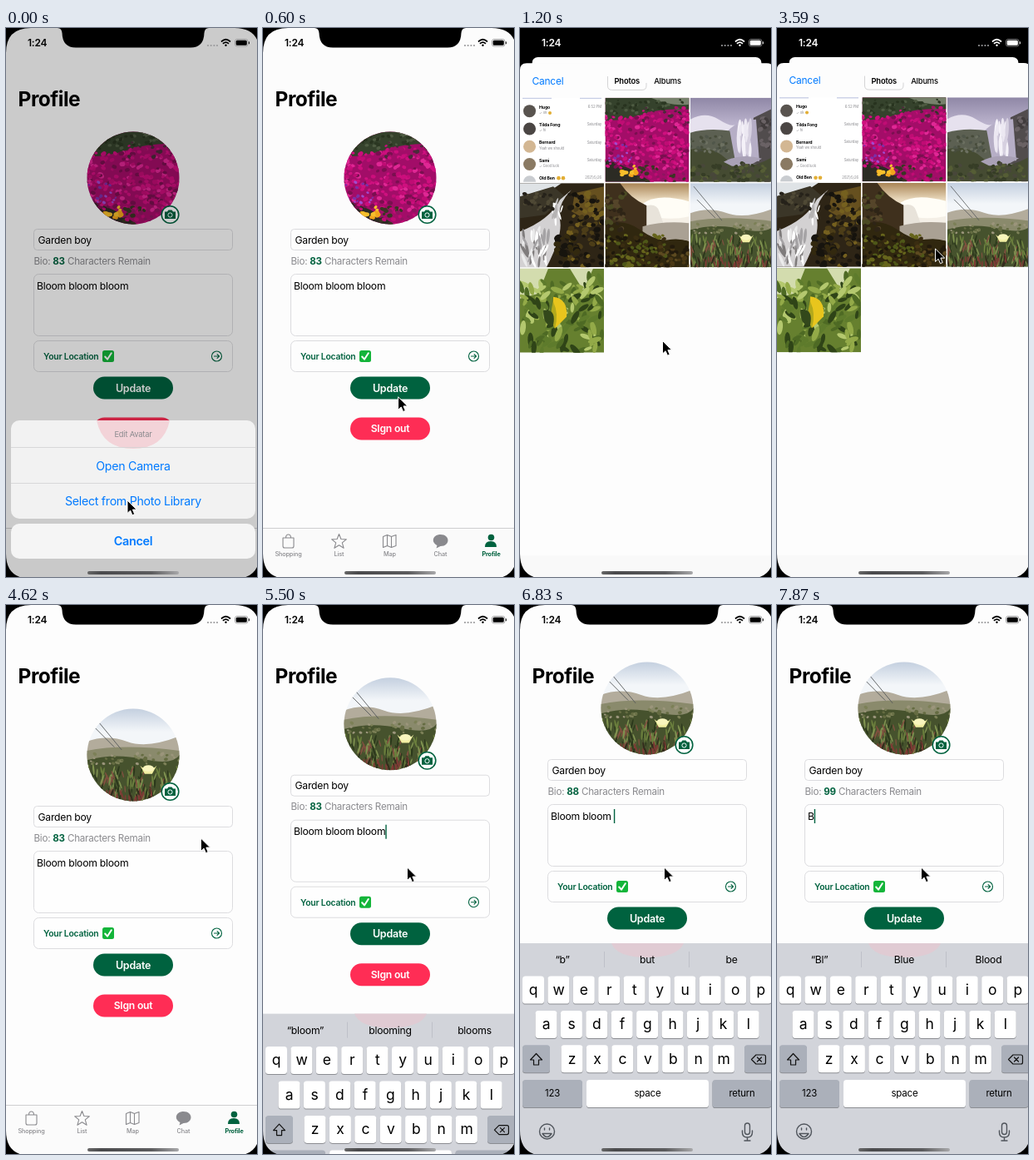
These frames come from a looping animation (302x659 px, 8 s). An HTML page:

```html
<!DOCTYPE html>
<html lang="en">
<head>
<meta charset="utf-8">
<title>Profile editor</title>
<style>
html, body { margin: 0; width: 100%; height: 100%; overflow: hidden; background: #000; }
svg { display: block; width: 100%; height: 100%; font-family: Inter, Roboto, sans-serif; }
text { letter-spacing: -.02em; white-space: pre; }
.mid { text-anchor: middle; }
.end { text-anchor: end; }
.semi { font-weight: 600; }
.bold { font-weight: 700; }
.blue { fill: #007aff; }
.green { fill: #00623f; }
.white { fill: #fff; }
.grey { fill: #8a8a8e; }
.field { fill: #fefefe; stroke: #d9d9dc; stroke-width: .9; }
.line { fill: none; stroke-linecap: round; stroke-linejoin: round; }
</style>
</head>
<body>
<svg viewBox="0 0 302 659" preserveAspectRatio="none">
<defs>
  <clipPath id="cardClip"><rect width="305" height="659" rx="8"/></clipPath>
  <clipPath id="avatarClip"><circle cx="153" cy="180" r="55.5"/></clipPath>
  <clipPath id="cellClip"><rect width="101" height="101"/></clipPath>
  <linearGradient id="dusk" x2="0" y2="1"><stop stop-color="#8f87a6"/><stop offset=".3" stop-color="#b9b1cb"/></linearGradient>
  <linearGradient id="glow" x2="0" y2="1"><stop stop-color="#a98455"/><stop offset=".2" stop-color="#e9d9bd"/><stop offset=".4" stop-color="#f4efe6"/></linearGradient>
  <linearGradient id="sky" x2="0" y2="1"><stop stop-color="#c3cfdf"/><stop offset=".25" stop-color="#f3f6f9"/></linearGradient>
  <linearGradient id="bar"><stop stop-color="#666"/><stop offset=".15" stop-color="#4a4a4c"/><stop offset=".7" stop-color="#5c5c5e"/><stop offset="1" stop-color="#a8a8aa"/></linearGradient>

  <g id="chats" clip-path="url(#cellClip)">
    <rect width="101" height="101" fill="#fff"/>
    <path d="M3 .5H38M72 .5H98" stroke="#8f9bc9" stroke-width=".8"/>
    <g id="chatRows"></g>
  </g>

  <g id="flowers" clip-path="url(#cellClip)">
    <rect width="101" height="101" fill="#a30d68"/>
    <path d="M0 0H101V14Q70 12 45 20T0 27Z" fill="#35422c"/>
    <path d="M55 0H101V8Q80 11 55 0" fill="#77816c"/>
    <path d="M0 74Q30 82 55 101H0Z" fill="#2c2b24"/>
    <g id="flowerDots"></g>
  </g>

  <g id="gorge" clip-path="url(#cellClip)">
    <rect width="101" height="101" fill="url(#dusk)"/>
    <path d="M0 26Q18 16 34 26T54 32L40 44H0Z" fill="#e6e1ee"/>
    <path d="M0 42Q20 36 50 40L60 80 0 92Z" fill="#5c6052"/>
    <path d="M76 24L101 12V80H70Z" fill="#514c4d"/>
    <path d="M47 38Q64 26 79 26L83 76H54Z" fill="#b6aec6"/>
    <g id="gorgeFall"></g>
    <path d="M0 62Q25 56 44 74T101 70V101H0Z" fill="#454b32"/>
    <path d="M40 77Q60 66 86 73L70 82H50Z" fill="#a9a1b6"/>
    <g id="gorgeDots"></g>
  </g>

  <g id="cascade" clip-path="url(#cellClip)">
    <rect width="101" height="101" fill="#2e2516"/>
    <path d="M0 0H50L38 8 0 22Z" fill="#dfe3e6"/>
    <path d="M0 16L40 4 54 16 30 38 0 42Z" fill="#3b3628"/>
    <path d="M62 8Q44 26 48 44T32 101H0V58Q36 44 48 20Z" fill="#d3d1d2"/>
    <g id="cascadeFall"></g>
    <path d="M66 12L101 4V30L80 44 62 34Z" fill="#66501f"/>
    <g id="cascadeDots"></g>
  </g>

  <g id="valley" clip-path="url(#cellClip)">
    <rect width="101" height="101" fill="url(#glow)"/>
    <path d="M46 24Q64 12 101 22V40Q74 46 52 38Z" fill="#fffdf6"/>
    <path d="M0 0H18Q30 18 50 27V62H0Z" fill="#3f301d"/>
    <path d="M50 27Q62 24 65 34L72 54H50Z" fill="#e8e3da"/>
    <path d="M45 52Q70 45 101 48V76H45Z" fill="#aaa194"/>
    <path d="M0 50Q22 42 42 56T76 68 101 70V101H0Z" fill="#30270f"/>
    <g id="valleyDots"></g>
  </g>

  <g id="meadow" clip-path="url(#cellClip)">
    <rect width="101" height="101" fill="url(#sky)"/>
    <path d="M0 36Q22 28 44 36T101 30V66H0Z" fill="#b3ac9c"/>
    <path d="M0 46Q40 38 101 46V70H0Z" fill="#8a8a6c"/>
    <path d="M0 56Q30 48 62 55T101 50V101H0Z" fill="#46522d"/>
    <path d="M4 4L38 45M8 20L30 42" stroke="#55585a" stroke-width=".8"/>
    <g id="meadowBlades"></g>
    <path d="M58 62Q62 67 67 62 72 67 76 62L71 71H63Z" fill="#f2efa2"/>
    <ellipse cx="67" cy="65" rx="6" ry="3.5" fill="#f8f5bd"/>
  </g>

  <g id="leaves" clip-path="url(#cellClip)">
    <rect width="101" height="101" fill="#66802f"/>
    <path d="M0 0H34L22 30 0 36ZM60 0H88L76 26Z" fill="#d3dcae"/>
    <g id="leafBlades"></g>
    <path d="M40 34Q58 36 56 58L42 72Q38 54 40 34" fill="#e8c51d"/>
    <path d="M40 40Q47 54 42 72 34 60 40 40" fill="#b3a91c"/>
    <path d="M28 50Q44 48 40 68 28 70 28 50" fill="#33481b"/>
  </g>
</defs>

<rect width="302" height="659"/>

<g id="screen" clip-path="url(#cardClip)">
  <rect width="305" height="659" fill="#fdfdfd"/>
  <text x="14.5" y="94" class="bold" font-size="24.5">Profile</text>
  <g id="form">
    <g clip-path="url(#avatarClip)">
      <use id="oldAvatar" href="#flowers" transform="translate(97 124) scale(1.11)"/>
      <use id="newAvatar" href="#meadow" transform="translate(97 124) scale(1.11)"/>
    </g>
    <circle cx="197.5" cy="224" r="10.3" fill="#fff" stroke="#00623f" stroke-width="1.6"/>
    <path class="green" d="M191 220.5h3l1.5-2h4l1.5 2h3v8.5h-13z"/>
    <circle cx="197.5" cy="224.5" r="2.6" fill="#00623f" stroke="#fff"/>
    <rect class="field" x="33.5" y="241.5" width="239" height="25" rx="4"/>
    <text x="38.5" y="258.5" font-size="12.2">Garden boy</text>
    <text x="33.5" y="283.7" font-size="11.6" class="grey">Bio: <tspan id="left" class="green bold">83</tspan> Characters Remain</text>
    <rect class="field" x="33.5" y="295.5" width="239" height="74" rx="6"/>
    <text id="bio" x="37" y="313.5" font-size="12.2">Bloom bloom bloom</text>
    <rect id="caret" y="301" width="1.4" height="17" class="green"/>
    <rect class="field" x="33.5" y="375.5" width="239" height="37" rx="6"/>
    <text x="45" y="398" class="semi green" font-size="10.4">Your Location</text>
    <rect x="116" y="387" width="14" height="14" rx="2.5" fill="#14b53a"/>
    <path class="line" d="M119.2 394.5l2.8 3.2 4.8-7.4" stroke="#fff" stroke-width="2"/>
    <g class="line" stroke="#00623f" stroke-width="1.1"><circle cx="253.5" cy="394" r="6"/><path d="M250.5 394h6m-2.4-2.4l2.4 2.4-2.4 2.4"/></g>
    <rect x="105" y="418.5" width="96" height="27" rx="13.5" class="green"/>
    <text x="153" y="436.6" class="mid semi white" font-size="12.5">Update</text>
    <rect x="105" y="467.5" width="96" height="27" rx="13.5" fill="#ff2d55"/>
    <text x="153" y="485.3" class="mid semi white" font-size="12.2">SIgn out</text>
  </g>
  <path d="M0 600.5H305V659H0Z" fill="#fbfbfb"/>
  <path d="M0 600.5H305" stroke="#cfcfd1"/>
  <g class="line" stroke="#8a8a8e" stroke-width="1.1">
    <path d="M24 612h13v10q0 2-2 2H26q-2 0-2-2zM27.5 612q0-4 3-4t3 4"/>
    <path d="M91.5 607.5l2.4 6 6.4.4-5 4 1.8 6.4-5.6-3.6-5.6 3.6 1.8-6.4-5-4 6.4-.4z"/>
    <path d="M144.5 610.5l5-2 5 2 5.5-2v13l-5.5 2-5-2-5 2zM149.5 608.5v13M154.5 610.5v13"/>
  </g>
  <path class="grey" d="M213.5 608c12 0 12 14 0 14l-5 2.5 1-3.5c-8-4-5-13 4-13"/>
  <path class="green" d="M267 623q0-7 7-7t7 7z"/><circle cx="274.5" cy="611.5" r="3.8" class="green"/>
  <g id="tabs" class="mid"></g>
</g>

<rect id="dim" width="302" height="659"/>

<g id="menu">
  <rect x="6" y="471" width="294" height="118" rx="10" fill="#f2f2f2"/>
  <path d="M109 471H197Q190 505 153 505T109 471" fill="#f3d3d8"/>
  <rect id="pressed" x="6" y="546.5" width="294" height="42.5" rx="8" fill="#dedede"/>
  <path d="M6 503.5H300M6 546.5H300" stroke="#d2d2d4" stroke-width=".8"/>
  <text x="153" y="491" class="mid grey" font-size="9.3">Edit Avatar</text>
  <text x="153" y="530.5" class="mid blue" font-size="14.2">Open Camera</text>
  <text x="153" y="573" class="mid blue" font-size="14.2">Select from Photo Library</text>
  <rect x="6" y="595" width="294" height="42" rx="10" fill="#f5f5f5"/>
  <text x="153" y="621" class="mid blue semi" font-size="14.4">Cancel</text>
</g>

<g id="picker">
  <path d="M0 680V8Q0 0 8 0H297Q305 0 305 8V680Z" fill="#fdfdfd"/>
  <rect y="591" width="302" height="89" fill="#f9f9f9"/>
  <text x="14.5" y="25.4" class="blue" font-size="12">Cancel</text>
  <path class="line" d="M105.5 16V27q0 5 5 5H147q5 0 5-5V24" stroke="#c9c9cb" stroke-width=".8"/>
  <text x="128.7" y="24.5" class="mid semi" font-size="9.4">Photos</text>
  <text x="177.5" y="24.5" class="mid" font-weight="500" font-size="9.4">Albums</text>
  <g id="grid"></g>
</g>

<g id="keyboard">
  <rect width="302" height="253" fill="#d2d4da"/>
  <path d="M110 0H197Q190 17 153 17T110 0" fill="#e5c9d1" opacity=".75"/>
  <path d="M101.5 10V29M203.5 10V29" stroke="#b9bcc3" stroke-width=".8"/>
  <g id="hints" class="mid" font-size="12.2"><text x="51" y="24"/><text x="153" y="24"/><text x="254.5" y="24"/></g>
  <g id="keys" class="mid"></g>
  <g class="line" stroke="#111" stroke-width="1.2">
    <path d="M19.5 132.5l7 7.5h-4v6h-6v-6h-4z"/>
    <path d="M284 134h9.5q2 0 2 2v7q0 2-2 2H284l-5.5-5.5zM285.5 137l5 5m0-5l-5 5"/>
  </g>
  <g class="line" stroke="#50555c" stroke-width="1.4">
    <circle cx="32.5" cy="226" r="9"/><path d="M27 228.5q5.5 8 11 0z"/>
    <path d="M29.5 222v2M35.5 222v2M267.5 225v2q0 6 6 6t6-6v-2M273.5 233v4M270 237h7"/>
    <rect x="270.5" y="216" width="6" height="13.5" rx="3"/>
  </g>
</g>

<path d="M0 0H305V661H0ZM30 0Q0 0 0 30V631Q0 661 30 661H275Q305 661 305 631V30Q305 0 275 0Z" fill-rule="evenodd"/>
<path d="M62 0Q67 0 67.5 6 68 23.5 84 23.5H222Q238 23.5 238.5 6 239 0 244 0Z"/>
<g id="status">
  <text x="26" y="22" class="semi" font-size="12">1:24</text>
  <g fill="#9a9a9c"><circle cx="243" cy="21" r="1.1"/><circle cx="246.7" cy="21" r="1.1"/><circle cx="250.4" cy="21" r="1.1"/><circle cx="254" cy="21" r="1.1"/></g>
  <path class="line" d="M259.5 16q5-4.5 10 0M261.5 18.4q3-2.6 6 0" stroke="currentColor" stroke-width="1.7"/>
  <circle cx="264.5" cy="20.7" r="1.2"/>
  <rect x="275.5" y="13.5" width="15.5" height="8.5" rx="2.5" fill="none" stroke="#929294" stroke-width=".8"/>
  <rect x="276.7" y="14.7" width="13.1" height="6.1" rx="1.5"/>
  <rect x="291.9" y="16.2" width="1" height="3" rx=".5"/>
</g>
<rect x="98" y="652" width="110" height="4" rx="2" fill="url(#bar)"/>
<path id="cursor" d="M0 0V15.5L3.6 12.2 6 17.7 8.7 16.5 6.4 11.1H11.2Z" stroke="#fff" stroke-width="1"/>
</svg>

<script>
const $ = id => document.getElementById(id);
const add = (id, markup) => { $(id).innerHTML += markup; };

let seed = 7;
const random = () => (seed = seed * 16807 % 2147483647) / 2147483647;
const between = (a, b) => a + (b - a) * random();

// Scatter ellipses over a box; a large stretch turns them into blades.
function scatter(id, count, [x0, y0, x1, y1], size, colors, stretch = .75, tilt = 40) {
  let out = '';
  for (let i = 0; i < count; i++) {
    const r = between(size * .5, size), turn = between(-tilt, tilt);
    const x = between(x0, x1), y = between(y0, y1);
    out += `<ellipse rx="${r}" ry="${r * stretch}" fill="${colors[i % colors.length]}" transform="translate(${x} ${y}) rotate(${turn})"/>`;
  }
  add(id, out);
}

scatter('flowerDots', 50, [0, 2, 101, 20], 2.5, ['#2b3722', '#4e5b42', '#28331f']);
scatter('flowerDots', 260, [0, 22, 101, 86], 3.2, ['#d0107f', '#c00c74', '#e02795', '#7a0f50', '#cc0e7c']);
scatter('flowerDots', 40, [45, 12, 101, 30], 2.8, ['#c80f7b', '#a50f68', '#4b2a3a']);
scatter('flowerDots', 50, [40, 82, 101, 101], 3, ['#c00c74', '#3a3524', '#8e1560']);
scatter('flowerDots', 18, [0, 52, 32, 80], 2.2, ['#a24bd0', '#7d2fa8']);
scatter('flowerDots', 14, [20, 82, 37, 94], 3.6, ['#f3a41c', '#f7c02c']);
scatter('gorgeFall', 18, [58, 36, 74, 64], 2.4, ['#ece8f2', '#d6d0e0', '#f4f1f8'], 6, 6);
scatter('gorgeDots', 40, [0, 46, 46, 66], 3, ['#50564a', '#6c7061', '#474c3b']);
scatter('gorgeDots', 24, [84, 22, 101, 68], 4, ['#403b3c', '#6a6265']);
scatter('gorgeDots', 80, [0, 78, 101, 101], 3.5, ['#363d26', '#555d35', '#48473a']);
scatter('cascadeFall', 34, [4, 60, 34, 96], 2, ['#fff', '#a5a3a5', '#ececec', '#7f7c7c'], 5, 30);
scatter('cascadeFall', 12, [40, 22, 50, 50], 1.8, ['#fff', '#b5b3b3'], 5, 20);
scatter('cascadeDots', 30, [4, 12, 40, 36], 3, ['#4f4935', '#26221a']);
scatter('cascadeDots', 90, [56, 12, 101, 101], 4.5, ['#201a10', '#4c3d18', '#16130d', '#75601f']);
scatter('cascadeDots', 30, [44, 62, 70, 101], 5, ['#17140e', '#33290f']);
scatter('valleyDots', 40, [0, 12, 24, 56], 4, ['#2e2416', '#55452a', '#4a4a22']);
scatter('valleyDots', 110, [0, 62, 72, 101], 3.5, ['#4e5718', '#1e180b', '#66651c', '#3a2d11']);
scatter('valleyDots', 35, [66, 76, 101, 101], 3.5, ['#4a3815', '#221a0c', '#5d4a20']);
scatter('meadowBlades', 40, [0, 48, 101, 60], 2.5, ['#7c8057', '#9b957b', '#656c42']);
scatter('meadowBlades', 150, [0, 66, 101, 99], 1.1, ['#6b7f3d', '#2b381b', '#80503f', '#7f9250'], 6, 24);
scatter('meadowBlades', 40, [0, 90, 101, 101], 1.2, ['#7d3a34', '#332b1c'], 5, 24);
scatter('leafBlades', 130, [0, 10, 101, 101], 3.6, ['#4e6a24', '#93aa48', '#2f4417', '#b4c86e', '#5e7b2c'], 2.6, 75);

const chats = [
  ['Hugo', '✓ ok', '6:52 PM', '#59544f'], ['Tilda Fong', '✓ hi', 'Saturday', '#4b4644'],
  ['Bernard', 'Yeah we should', 'Saturday', '#d3b793'], ['Sami', '✓ Good luck', 'Saturday', '#8a7a63'],
  ['Old Ben', '', '2021/5/26', '#c9ccd0']
];
chats.forEach(([name, note, when, color], i) => {
  const y = 13 + 21.3 * i;
  add('chatRows', `<circle cx="11.5" cy="${y + 3}" r="7.5" fill="${color}"/>
    <text x="23" y="${y}" class="bold" font-size="5.2">${name}</text>
    <text x="23" y="${y + 6.5}" class="grey" font-size="4.2">${note}</text>
    <text x="98" y="${y - .5}" class="grey end" font-size="4.3">${when}</text>`);
});
add('chatRows', '<g fill="#e2ae35"><circle cx="36" cy="18.3" r="2"/><circle cx="46.5" cy="96.5" r="2.3"/><circle cx="52" cy="96.5" r="2.3"/></g>');

['chats', 'flowers', 'gorge', 'cascade', 'valley', 'meadow', 'leaves'].forEach((name, i) =>
  add('grid', `<use href="#${name}" x="${i % 3 * 102.5}" y="${41.3 + Math.floor(i / 3) * 102.5}"/>`));

['Shopping', 'List', 'Map', 'Chat', 'Profile'].forEach((name, i) =>
  add('tabs', `<text x="${30.5 + 61 * i}" y="633.7" font-size="7.3" class="${name === 'Profile' ? 'green bold' : 'grey'}" font-weight="500">${name}</text>`));

function key(x, y, width, label, size, fill = '#fff') {
  const box = `x="${x}" width="${width}" height="33" rx="3.6"`;
  add('keys', `<rect ${box} y="${y + 1}" fill="#8b8d92"/><rect ${box} y="${y}" fill="${fill}"/>
    <text x="${x + width / 2}" y="${y + 16.5 + size * .33}" font-size="${size}">${label}</text>`);
}
[['qwertyuiop', 3], ['asdfghjkl', 18.5], ['zxcvbnm', 49.5]].forEach(([letters, x], row) =>
  [...letters].forEach((c, i) => key(x + 30.4 * i, 39.5 + 41.4 * row, 26, c, 17.5)));
const darkKey = '#abb0ba';
key(3, 122.3, 33, '', 12, darkKey);
key(270, 122.3, 36, '', 12, darkKey);
key(3, 164, 72, '123', 11.4, darkKey);
key(80, 164, 147, 'space', 11.6);
key(231.5, 164, 71, 'return', 11.4, darkKey);

const LOOP = 8000, SAMPLE = 148.3;
const MENU_OUT = 230, PICKER_IN = 646, PICKER_OUT = 4060, KEYS_IN = 5362;
const BIO = 'Bloom bloom bloom';
const HINTS = {
  bloom: ['blooming', 'blooms'], bloo: ['blood', 'bloom'], blo: ['block', 'blog'],
  bl: ['blue', 'blood'], b: ['but', 'be'], '': ['the', 'and']
};
const PATH = [
  [0, 146, 567], [290, 146, 567], [600, 163, 440], [880, 171.5, 375.5], [1930, 171.5, 375.5], [2450, 130, 384],
  [2966, 78, 373], [3114, 65, 354], [3263, 92, 327], [3559, 190.5, 265], [3855, 228, 238],
  [4155, 228, 238], [4597, 234.5, 280], [5190, 173.5, 315]
];

// Remaining distance of a critically damped spring started at `start`.
function rest(t, start) {
  const x = Math.max(0, t - start) * .01826;
  return (1 + x) * Math.exp(-x);
}

function pointer(t) {
  const i = PATH.findIndex(p => p[0] > t);
  if (i < 0) return PATH[PATH.length - 1].slice(1);
  const [a, b] = [PATH[i - 1], PATH[i]], k = (t - a[0]) / (b[0] - a[0]);
  return [a[1] + (b[1] - a[1]) * k, a[2] + (b[2] - a[2]) * k];
}

// One delete, the key-repeat delay, then a steady repeat.
function bioAt(t) {
  const repeats = Math.max(0, Math.floor((t - 6450) / 100) + 1);
  return BIO.slice(0, BIO.length - (t < 5960 ? 0 : 1 + repeats));
}

function hintsFor(text) {
  const word = text.split(' ').pop();
  const first = !text.includes(' ');
  const options = HINTS[word.toLowerCase()].map(w => first ? w[0].toUpperCase() + w.slice(1) : w);
  return [`“${word}”`, ...options];
}

const move = (id, x, y, scale = 1) => $(id).setAttribute('transform', `translate(${x} ${y}) scale(${scale})`);
const show = (id, on) => { $(id).style.display = on ? '' : 'none'; };

function draw(t) {
  const menu = rest(t, MENU_OUT);
  show('menu', menu > .004);
  show('pressed', t > 100);
  move('menu', 0, 195 * (1 - menu));
  $('dim').setAttribute('opacity', .2 * menu);

  const picked = t >= PICKER_OUT;
  const open = picked ? rest(t, PICKER_OUT) : 1 - rest(t, PICKER_IN);
  const up = open > .001 ? open : 0;
  const scale = 1 - .094 * up;
  show('picker', up);
  move('picker', 0, 42 + 617 * (1 - up));
  move('screen', 153 * (1 - scale), 35 * up, scale);
  const shade = Math.round(255 * up ** 6);
  $('status').style.fill = $('status').style.color = `rgb(${shade},${shade},${shade})`;
  show('oldAvatar', !picked);
  show('newAvatar', picked);

  const typing = t > KEYS_IN, down = rest(t, KEYS_IN);
  show('keyboard', typing);
  show('caret', typing);
  move('keyboard', 0, 406 + 253 * down);
  move('form', 0, -56 * (1 - down));

  const text = bioAt(t);
  $('bio').textContent = text;
  $('left').textContent = 100 - text.length;
  $('caret').setAttribute('x', 37 + $('bio').getComputedTextLength());
  hintsFor(bioAt(t - 100)).forEach((hint, i) => { $('hints').children[i].textContent = hint; });

  move('cursor', ...pointer(t));
}

const begin = performance.now();
function tick() {
  const t = (performance.now() - begin) % LOOP;
  draw(Math.floor(t / SAMPLE) * SAMPLE);
  requestAnimationFrame(tick);
}
tick();
</script>
</body>
</html>
```
